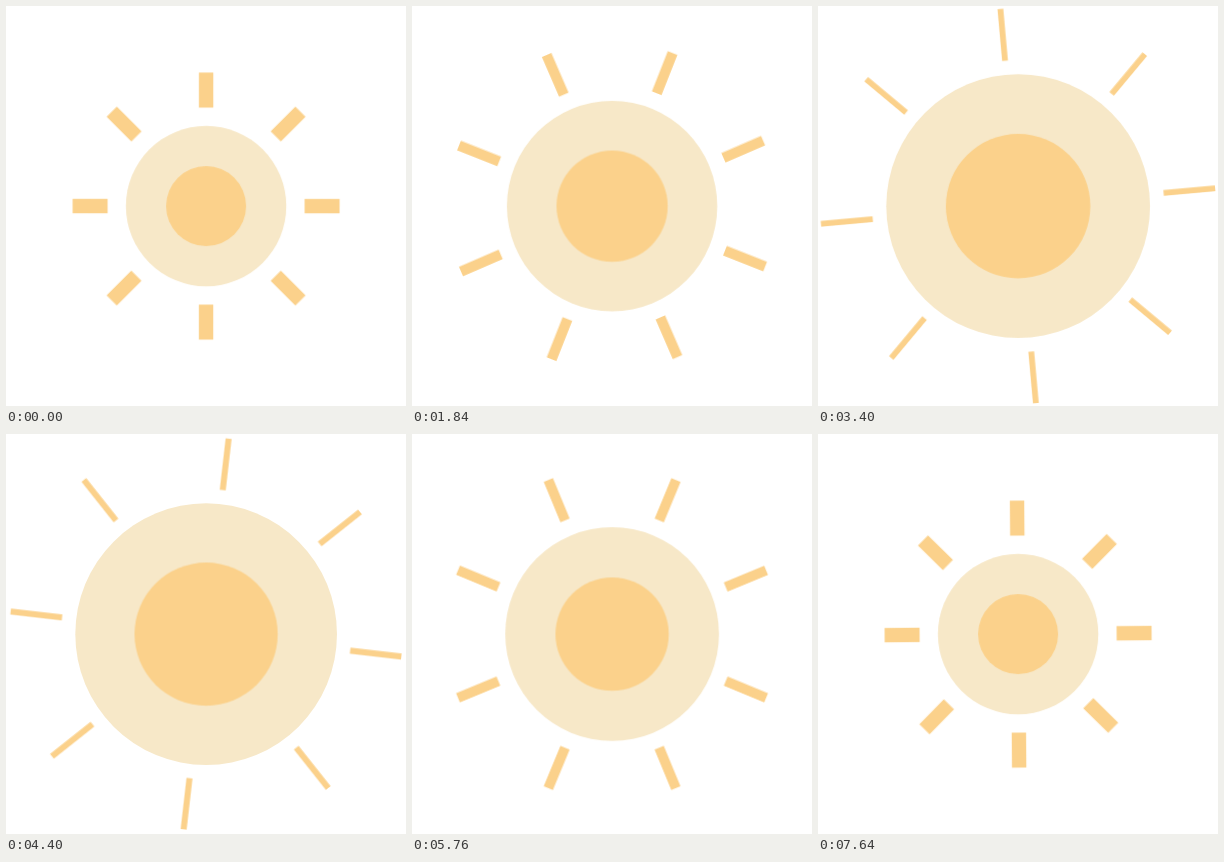
Recreate the animation shown at these times as an HTML page without scripts. Size 400x400 px, loop 7680 ms.

```html
<!DOCTYPE html>
<html lang="en">
<head>
<meta charset="utf-8">
<title>Pulsing sun</title>
<style>
  html, body { margin: 0; width: 100%; height: 100%; overflow: hidden; background: #fff; }
  svg { display: block; width: 100%; height: 100%; }

  .halo { fill: #f7e8c8; }
  .core, .rays { fill: #fbd18b; }

  .halo, .core, .ray {
    transform-origin: 0 0;
    animation: swell 3.84s cubic-bezier(.364, 0, .636, 1) infinite alternate;
  }
  .halo { --grow: 1.666; }
  .core { --grow: 1.833; }
  .ray { animation-name: stretch; }

  /* Eight-fold symmetry: a quarter turn closes the loop. */
  .rays { transform-origin: 0 0; animation: turn 7.68s linear infinite; }

  @keyframes swell { from { transform: scale(1); } to { transform: scale(var(--grow)); } }
  @keyframes stretch { from { transform: scale(1, 1); } to { transform: scale(.39, 1.5); } }
  @keyframes turn { from { transform: rotate(0deg); } to { transform: rotate(90deg); } }
</style>
</head>
<body>
<svg viewBox="0 0 400 400">
  <g transform="translate(200.1 200.1)">
    <circle class="halo" r="80.2"/>
    <circle class="core" r="40"/>
    <g class="rays">
      <g><path class="ray" d="M-7.2-133.4h14.4v35h-14.4zm0 231.8h14.4v35h-14.4z"/></g>
      <g transform="rotate(45)"><path class="ray" d="M-7.2-133.4h14.4v35h-14.4zm0 231.8h14.4v35h-14.4z"/></g>
      <g transform="rotate(90)"><path class="ray" d="M-7.2-133.4h14.4v35h-14.4zm0 231.8h14.4v35h-14.4z"/></g>
      <g transform="rotate(135)"><path class="ray" d="M-7.2-133.4h14.4v35h-14.4zm0 231.8h14.4v35h-14.4z"/></g>
    </g>
  </g>
</svg>
</body>
</html>
```
